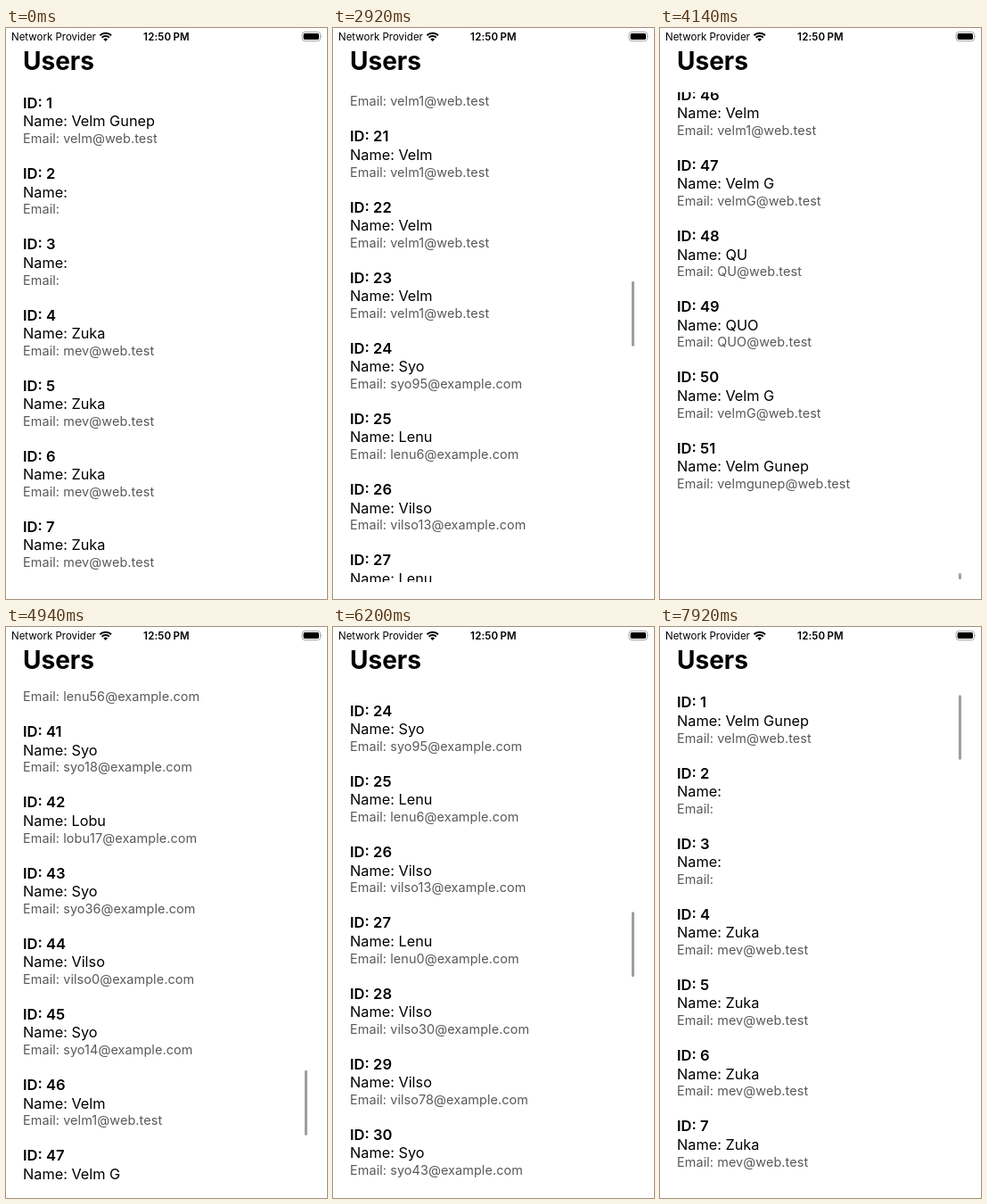
An HTML page for the animation above (8000 ms loop, 360 px wide and 640 px high).

```html
<!DOCTYPE html>
<html lang="en">
<head>
<meta charset="utf-8">
<title>Users</title>
<style>
  html, body { margin: 0; width: 100%; height: 100%; overflow: hidden; background: #fff; }
  svg { display: block; width: 360px; height: 640px; font-family: Inter, Roboto, sans-serif; }
  .status { font-size: 11.5px; }
  .clock { font-weight: 600; text-anchor: middle; letter-spacing: .2px; }
  .title { font-size: 28px; font-weight: 700; }
  .id { font-size: 16.6px; font-weight: 600; }
  .name { font-size: 16.3px; }
  .email { font-size: 14.4px; letter-spacing: .1px; fill: #585858; }
</style>
</head>
<body>
<svg viewBox="0 0 360 640">
  <defs><clipPath id="view"><rect y="72" width="360" height="549"/></clipPath></defs>
  <rect width="360" height="640" fill="#fff"/>
  <g clip-path="url(#view)"><g id="list"></g></g>
  <rect id="bar" x="334.9" width="3" rx="1.5" fill="#9c9c9c"/>

  <text class="status" x="6" y="14">Network Provider</text>
  <g fill="none" stroke="#000" stroke-width="1.9">
    <path d="M105.4 8.3a9 9 0 0 1 12.6 0"/>
    <path d="M107.6 10.7a5.9 5.9 0 0 1 8.2 0"/>
  </g>
  <path d="M109.3 12.6a3.5 3.5 0 0 1 4.8 0l-2.4 2.4z"/>
  <text class="status clock" x="180" y="14">12:50&#8201;PM</text>
  <rect x="332" y="4.5" width="20.6" height="10" rx="3" fill="none" stroke="#a3a3a3"/>
  <rect x="333.6" y="6.1" width="17.4" height="6.8" rx="1.7"/>
  <path d="M353.7 7.9q1.6 1.6 0 3.2z" fill="#a3a3a3"/>
  <text class="title" x="19" y="47.3">Users</text>
</svg>
<script>
const LOOP = 8000, PITCH = 79.17, MAX_SCROLL = 3493;
const SPRING = 0.0085;
const list = document.getElementById('list');
const bar = document.getElementById('bar');

// Entries 24 to 45: name and number joined
const guests = ('Syo95 Lenu6 Vilso13 Lenu0 Vilso30 Vilso78 Syo43 Lobu21 Lenu64 Syo7 Vilso52 ' +
  'Lobu88 Lenu31 Syo70 Lobu4 Vilso19 Lenu56 Syo18 Lobu17 Syo36 Vilso0 Syo14').split(' ');
const lastUsers = [
  ['Velm', 'velm1'], ['Velm G', 'velmG'], ['QU', 'QU'],
  ['QUO', 'QUO'], ['Velm G', 'velmG'], ['Velm Gunep', 'velmgunep']
];

function userFor(id) {
  const local = (name, box) => [name, box + '@web.test'];
  if (id === 1) return local('Velm Gunep', 'velm');
  if (id < 4) return ['', ''];
  if (id < 10) return local('Zuka', 'mev');
  if (id < 14) return local(id === 10 ? 'KU' : 'KUU', 'mev');
  if (id < 24) return local('Velm', 'velm1');
  if (id < 46) {
    const guest = guests[id - 24];
    return [guest.replace(/\d+/, ''), guest.toLowerCase() + '@example.com'];
  }
  return local(...lastUsers[id - 46]);
}

function addText(kind, y, content) {
  const node = document.createElementNS('http://www.w3.org/2000/svg', 'text');
  node.setAttribute('class', kind);
  node.setAttribute('x', 19);
  node.setAttribute('y', y);
  node.textContent = content;
  list.append(node);
}

for (let id = 1; id <= 51; id++) {
  const top = (id - 1) * PITCH;
  const [name, email] = userFor(id);
  addText('id', top + 90, 'ID: ' + id);
  addText('name', top + 110.4, 'Name: ' + name);
  addText('email', top + 129.2, 'Email: ' + email);
}

// Screen updates come in bursts: start, end, count
const bursts = [
  [1300, 1730, 5], [1910, 2700, 8], [2810, 3580, 8], [3690, 4490, 8], [4600, 5380, 8],
  [5480, 6050, 6], [6200, 6940, 8], [7040, 7820, 8], [7920, 7920, 1]
];

function snap(time) {
  const burst = bursts.findLast(([start]) => start <= time);
  if (!burst) return 0;
  const [start, end, count] = burst;
  if (count === 1) return start;
  const step = (end - start) / (count - 1);
  return start + step * Math.min(count - 1, Math.floor((time - start + 8) / step));
}

// Finger and flick motion: time, scroll offset, velocity in px/ms
const keys = [
  [1240, 0, 0], [1730, 419, 0], [1910, 422.5, 0], [2920, 1546, 1], [4040, MAX_SCROLL, 1.83],
  [4600, 3502, 0], [4934, 3134, -1.6], [6050, 1814, 0], [6200, 1811, 0], [6900, 0, -2.2]
];

const bounce = (elapsed, speed) => speed * elapsed * Math.exp(-SPRING * elapsed);

function scrollAt(time) {
  if (time <= keys[0][0]) return 0;
  if (time >= 6900) return bounce(time - 6900, -2.2);
  if (time >= 4040 && time < 4600) return MAX_SCROLL + bounce(time - 4040, 1.83);
  const next = keys.findIndex(key => key[0] > time);
  const [t0, y0, v0] = keys[next - 1];
  const [t1, y1, v1] = keys[next];
  const span = t1 - t0, u = (time - t0) / span, w = 1 - u;
  return y0 * (1 + 2 * u) * w * w + v0 * span * u * w * w
       + y1 * u * u * (3 - 2 * u) - v1 * span * u * u * w;
}

function draw(time) {
  const shown = snap(time);
  const scroll = scrollAt(shown);
  const inside = Math.max(0, Math.min(MAX_SCROLL, scroll));
  const height = Math.max(7, 73 - Math.abs(scroll - inside));
  const top = scroll > MAX_SCROLL ? 618 - height : 76.2 + inside * 0.1342;
  list.setAttribute('transform', `translate(0 ${-scroll})`);
  bar.setAttribute('y', top);
  bar.setAttribute('height', height);
  bar.setAttribute('visibility', shown < 1300 ? 'hidden' : 'visible');
}

const began = performance.now();
function tick() {
  draw((performance.now() - began) % LOOP);
  requestAnimationFrame(tick);
}
tick();
</script>
</body>
</html>
```
